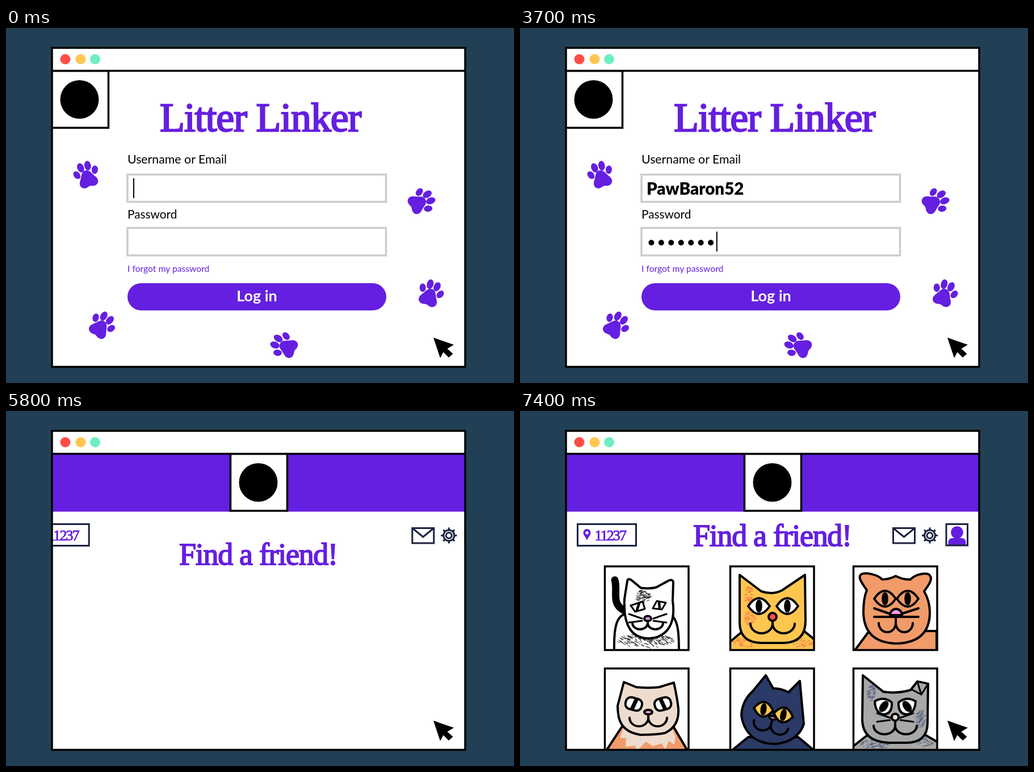
An HTML page for the animation above (8 s loop, 895 by 626 pixels).

```html
<!DOCTYPE html>
<html lang="en">
<head>
<meta charset="utf-8">
<title>Login and browse</title>
<style>
html, body { margin: 0; width: 100%; height: 100%; overflow: hidden; background: #224055; }
svg { display: block; width: 895px; height: 626px; }
text { font-family: Lato, sans-serif; white-space: pre; }
.serif { font-family: "Liberation Serif", serif; fill: #651fe0; stroke: #651fe0; }
.violet { fill: #651fe0; }
.ink { fill: none; stroke: #1a2140; stroke-width: 3; }
.cat { fill: none; stroke: #000; stroke-width: 4; stroke-linejoin: round; stroke-linecap: round; }
.box { fill: none; stroke: #000; stroke-width: 3.5; }
</style>
</head>
<body>
<svg viewBox="0 0 895 626">
  <defs>
    <clipPath id="page"><rect x="82" y="77" width="726" height="519"/></clipPath>
    <g id="paw" class="violet">
      <path d="M0-8C8-8 9 0 14 7C19 14 16 22 8 22C4 22 3 20.500 0 20.500S-4 22-8 22C-16 22-19 14-14 7C-9 0-8-8 0-8Z"/>
      <ellipse rx="5.500" ry="7.500" transform="translate(-16.500-4.500) rotate(-22)"/>
      <ellipse rx="5.800" ry="8.500" transform="translate(-6.500-15) rotate(-6)"/>
      <ellipse rx="5.800" ry="8.500" transform="translate(6.500-15) rotate(6)"/>
      <ellipse rx="5.500" ry="7.500" transform="translate(16.500-4.500) rotate(22)"/>
    </g>
  </defs>
  <rect width="895" height="626" fill="#224055"/>
  <rect x="81" y="35" width="728" height="562.500" fill="#fff"/>
  <g clip-path="url(#page)">
    <g id="form">
      <text class="serif" x="271" y="182" font-size="72" letter-spacing="-1.200" stroke-width="2.400">Litter Linker</text>
      <text x="214" y="238.500" font-size="21.300">Username or Email</text>
      <text x="214" y="336" font-size="20.800">Password</text>
      <text class="violet" x="214" y="430" font-size="15.700">I forgot my password</text>
      <g fill="#fff" stroke="#ccc" stroke-width="3.500">
        <rect x="214" y="258.500" width="455.500" height="48"/>
        <rect x="214" y="352.500" width="455.500" height="48.500"/>
      </g>
      <rect class="violet" x="214" y="450" width="456" height="48" rx="24"/>
      <text x="442" y="482" font-size="27" font-weight="700" fill="#fff" text-anchor="middle">Log in</text>
      <g id="paws"></g>
      <text id="user" x="223" y="293.500" font-size="29.500" font-weight="900"></text>
      <g id="dots"></g>
      <rect id="caret" width="2" height="35"/>
    </g>
    <rect id="barL" class="violet" x="82" y="77" height="100.500"/>
    <rect id="barR" class="violet" y="77" height="100.500"/>
    <g id="logo">
      <rect class="box" x="80.500" y="75.500" width="100" height="100.500" style="fill:#fff"/>
      <circle cx="129.500" cy="126" r="34"/>
    </g>
    <text id="title" class="serif" x="305" y="237.500" font-size="54" letter-spacing="-1.300" stroke-width="1.800">Find a friend!</text>
    <g id="place">
      <rect class="ink" x="101.500" y="199.500" width="103" height="38"/>
      <path class="violet" fill-rule="evenodd" d="M118 228C115 221 111.500 219 111.500 214.500A6.500 6.500 0 0 1 124.500 214.500C124.500 219 121 221 118 228ZM118 212a2.800 2.800 0 1 0 .01 0Z"/>
      <text class="serif" x="131.500" y="228" font-size="26" letter-spacing="-1.900" stroke-width=".9">11237</text>
    </g>
    <g id="tools">
      <path class="ink" d="M657.500 206.500H695.500V233H657.500ZL676.500 222L695.500 206.500"/>
      <g class="ink" id="gear"><circle cx="722" cy="219.500" r="9.500"/><circle cx="722" cy="219.500" r="5"/></g>
      <circle class="violet" cx="770" cy="214" r="10.800"/>
      <path class="violet" d="M754.500 237V232Q754.500 224 763 224H777Q785.500 224 785.500 232V237Z"/>
      <rect class="ink" x="751" y="199.500" width="37.500" height="37.500"/>
    </g>
    <g id="cards"></g>
  </g>
  <g class="box">
    <rect x="81" y="35" width="728" height="562.500"/>
    <path d="M81 75.500H809"/>
  </g>
  <circle cx="104.500" cy="55" r="9" fill="#ff4d47"/>
  <circle cx="131.500" cy="55" r="9" fill="#ffc64f"/>
  <circle cx="157" cy="55" r="9" fill="#6eefc1"/>
  <path id="pointer" d="M0 0L36 12.500L24.500 19.500L34.500 28.500L27 35L17.500 25.500L12 36Z"/>
</svg>
<script>
const $ = id => document.getElementById(id);
const clamp = (v, lo, hi) => Math.min(hi, Math.max(lo, v));
const ease = (t, from, to) => {
  const u = clamp((t - from) / (to - from), 0, 1);
  return u * u * (3 - 2 * u);
};
const move = (id, x, y) => $(id).setAttribute('transform', `translate(${x} ${y})`);

// Drawing helpers, all returning SVG markup
const path = (d, fill = 'none', more = '') => `<path d="${d}" fill="${fill}" ${more}/>`;
const oval = (x, y, rx, ry, fill, turn = 0) =>
  `<ellipse cx="${x}" cy="${y}" rx="${rx}" ry="${ry}" fill="${fill}" transform="rotate(${turn} ${x} ${y})"/>`;
const turned = (a, x, y, s) => `<g transform="rotate(${a} ${x} ${y})">${s}</g>`;
const eye = (x, y, w, h, fill, turn = 0) => turned(turn, x, y,
  path(`M${x - w} ${y}Q${x} ${y - 2 * h} ${x + w} ${y}Q${x} ${y + 2 * h} ${x - w} ${y}Z`, fill) +
  oval(x, y, w * .2, h * .68, '#000'));
const mouth = (x, y, w, h, stem) =>
  path(`M${x - w} ${y}A${w / 2} ${h} 0 0 0 ${x} ${y}A${w / 2} ${h} 0 0 0 ${x + w} ${y}M${x} ${y}v${-stem}`);
const whiskers = (x, y, inner, outer) => [-1, 1].map(s =>
  path(`M${x + s * inner} ${y}L${x + s * outer} ${y - 8}M${x + s * inner} ${y + 4}L${x + s * outer} ${y + 7}`, 'none', 'stroke-width="3"')).join('');

let seed = 7;
const rand = () => (seed = seed * 16807 % 2147483647) / 2147483647;
// Crayon texture: short slanted strokes inside an oval
function scribble(x, y, rx, ry, color, n, slope = -.6) {
  let d = '';
  for (let i = 0; i < n; i++) {
    const a = rand() * 6.283, r = Math.sqrt(rand()), len = 1.5 + rand() * 4;
    d += `M${(x + rx * r * Math.cos(a)).toFixed(1)} ${(y + ry * r * Math.sin(a)).toFixed(1)}l${len.toFixed(1)} ${(len * slope + rand() * 2).toFixed(1)}`;
  }
  return path(d, 'none', `style="stroke:${color};stroke-width:1"`);
}

const white = '#fff', yellow = '#ffc64f', orange = '#f09b69', cream = '#eddcce',
      navy = '#2b3a66', gray = '#a8a8a8', pink = '#ff9be6', smudge = '#535f80', coral = '#f2784b';

const cats = [
  // white cat with a black tail
  path('M167 298C173 318 160 338 182 351', 'none', 'stroke-width="13"') +
  path('M166 424C165 380 170 357 192 357H262C280 365 280 395 280 424', white) +
  scribble(221, 404, 50, 12, '#222', 190, .25) +
  path('M184 345C184 338 183 335 185 325L189 300Q190 294 196 298L213 312Q228 314 240 311L262 299Q270 296 270 303L269 335Q274 370 258 388Q245 401 227 401Q205 401 194 385Q184 370 184 345Z', white) +
  scribble(215, 327, 13, 11, '#222', 75) +
  path('M195 343L216 336L220 349L203 354ZM234 348L250 350L257 338L241 335Z', white, 'stroke-width="3"') +
  path('M210 339L206 351M245 338L246 348', 'none', 'stroke-width="4.500"') +
  whiskers(225, 366, 10, 33) + oval(225, 366, 6, 4.5, pink) + mouth(225, 374, 27, 11, 4),

  // yellow cat
  path('M369 408L395 386H498L520 404V424H369Z', yellow) +
  scribble(395, 408, 20, 10, coral, 55) + scribble(495, 410, 18, 8, coral, 40) +
  path('M387 289L425 318Q445 325 462 316L502 289L503 370Q503 408 465 409H425Q388 408 387 375Z', yellow) +
  scribble(402, 326, 8, 17, coral, 60) + scribble(403, 366, 10, 13, coral, 50) +
  eye(421, 344, 19, 14, white) + eye(471, 344, 19, 14, white) +
  mouth(445, 375, 39, 17, 5) + oval(445, 363, 7, 7, '#ff4d47'),

  // orange cat
  path('M590 422L618 384L712 388H734V422Z', orange) +
  path('M611 316C604 305 594 294 601 288C608 284 630 288 638 297Q650 297 662 291Q676 298 688 297C697 287 718 284 722 290C728 297 719 308 712 318Q722 335 722 355Q722 409 662 410Q606 408 605 355Q605 330 611 316Z', orange) +
  eye(643, 331, 19, 14, orange) + eye(683, 331, 19, 14, orange) +
  path('M624 348L650 357M702 348L674 357M624 363H702') +
  path('M652 360A10.500 11 0 0 1 673 360Z', pink) + mouth(662, 374, 30, 16, 11),

  // cream cat
  path('M150 602L180 556H270L297 602Z', orange) +
  path('M182 560L176 576L187 577L186 592L203 590L205 600L222 583L234 591L250 586L256 597L262 582L272 588L274 574L268 560Z', cream, 'stroke="none"') +
  path('M183 478L205 487Q226 489 245 487L271 479Q277 505 279 525Q281 556 255 568Q240 571 212 571Q180 566 174 540Q172 530 172 520Z', cream) +
  turned(15, 200, 516, '<rect x="186" y="506" width="29" height="21" rx="9" fill="#fff"/>' + path('M203 508L200 525', 'none', 'stroke-width="7"')) +
  turned(-15, 252, 516, '<rect x="237" y="506" width="29" height="21" rx="9" fill="#fff"/>' + path('M250 508L253 525', 'none', 'stroke-width="7"')) +
  mouth(226, 541, 33, 15, 6) + oval(226, 531, 7, 4, pink),

  // navy cat
  path('M369 602L402 575H490L520 600V606H369Z', navy) +
  path('M433 466L446 489Q460 489 473 496L493 476L500 552Q490 582 452 587Q430 588 412 577Q392 560 390 535Q392 510 410 494Z', navy) +
  eye(429, 526, 17, 13, yellow, 8) + eye(464, 536, 17, 13, yellow, 12) +
  turned(14, 443, 550, mouth(443, 553, 31, 14, 8)) + oval(445, 541, 6, 3, pink, 14),

  // gray cat with a folded ear
  path('M586 592L614 570H712L736 584V606H586Z', gray) +
  scribble(625, 588, 26, 9, smudge, 70) + scribble(710, 584, 16, 9, smudge, 35) +
  path('M604 466L640 495Q663 499 688 492L700 477L719 481L718 550Q718 585 680 585H650Q604 583 603 545Z', gray) +
  path('M700 477L719 481L707 500ZM690 491L707 500', gray, 'stroke-width="3"') +
  scribble(617, 498, 7, 14, smudge, 50, -1) + scribble(704, 545, 8, 17, smudge, 60, -1) +
  path('M625 512Q641 502 655 514Q656 534 641 535Q626 533 625 512ZM697 512Q681 502 667 514Q666 534 681 535Q696 533 697 512Z', white) +
  oval(641, 521, 4.5, 9, '#000', 35) + oval(682, 521, 4.5, 9, '#000', -35) +
  whiskers(661, 541, 9, 32) + mouth(661, 555, 38, 15, 9) + oval(661, 540, 6, 6, cream)
];

$('cards').innerHTML = cats.map((cat, i) => {
  const x = [149.5, 370.5, 587.5][i % 3], y = i < 3 ? 274 : 454;
  const frame = `x="${x}" y="${y}" width="147.500" height="147.500"`;
  return `<clipPath id="clip${i}"><rect ${frame}/></clipPath><g id="card${i}"><rect ${frame} fill="#fff"/>` +
    `<g class="cat" clip-path="url(#clip${i})">${cat}</g><rect class="box" ${frame}/></g>`;
}).join('');

$('paws').innerHTML = [[142, 259, -17], [732, 306, 62], [748, 468, 21], [169, 524, 35], [490, 560, -63]]
  .map(([x, y, a]) => `<use href="#paw" transform="translate(${x} ${y}) rotate(${a})"/>`).join('');

for (let a = 0; a < 360; a += 45)
  $('gear').innerHTML += `<path d="M722 205.500v5" transform="rotate(${a} 722 219.500)"/>`;

const login = 'PawBaron52';

function draw(t) {
  // typing
  const typed = clamp((t - 1800) / 100, 0, login.length);
  const dots = clamp((t - 3000) / 100, 0, 7);
  const inPassword = t >= 2900;
  $('form').style.display = t < 4900 ? '' : 'none';
  $('user').textContent = login.slice(0, typed);
  $('dots').innerHTML = Array.from({ length: dots }, (_, i) =>
    `<circle cx="${231.4 + 17.45 * i}" cy="378.500" r="5"/>`).join('');
  const off = t >= 400 && t < 800 || t >= 1200 && t < 1500 || t >= 4000;
  $('caret').style.display = off ? 'none' : '';
  $('caret').setAttribute('x', inPassword ? 224 + 17.4 * dots
    : 224 + (typed && $('user').getComputedTextLength()));
  $('caret').setAttribute('y', inPassword ? 359 : 265);

  // pointer goes to the button and back
  const reach = ease(t, 3900, 4500) - ease(t, 4900, 5500);
  move('pointer', 753 - 165 * reach, 546 - 65 * reach);

  // second page slides together
  move('logo', 315 * ease(t, 4900, 5400), 0);
  const bar = 313 * ease(t, 5300, 5715);
  $('barL').setAttribute('width', bar);
  $('barR').setAttribute('width', bar);
  $('barR').setAttribute('x', 808 - bar);
  const left = Math.max(0, 6050 - t);
  move('title', 0, 357 * (left / 550) ** 3);
  const side = 160 * (left / 350) ** 3;
  move('place', -side, 0);
  move('tools', side, 0);
  cats.forEach((_, i) => move('card' + i, 0, 340 * (1 - ease(t, 6500 + 60 * i, 7100 + 60 * i))));
}

const start = performance.now();
function tick() {
  const t = (performance.now() - start) % 8000;
  draw(Math.floor(t / 100) * 100); // ten pictures a second
  requestAnimationFrame(tick);
}
tick();
</script>
</body>
</html>
```
